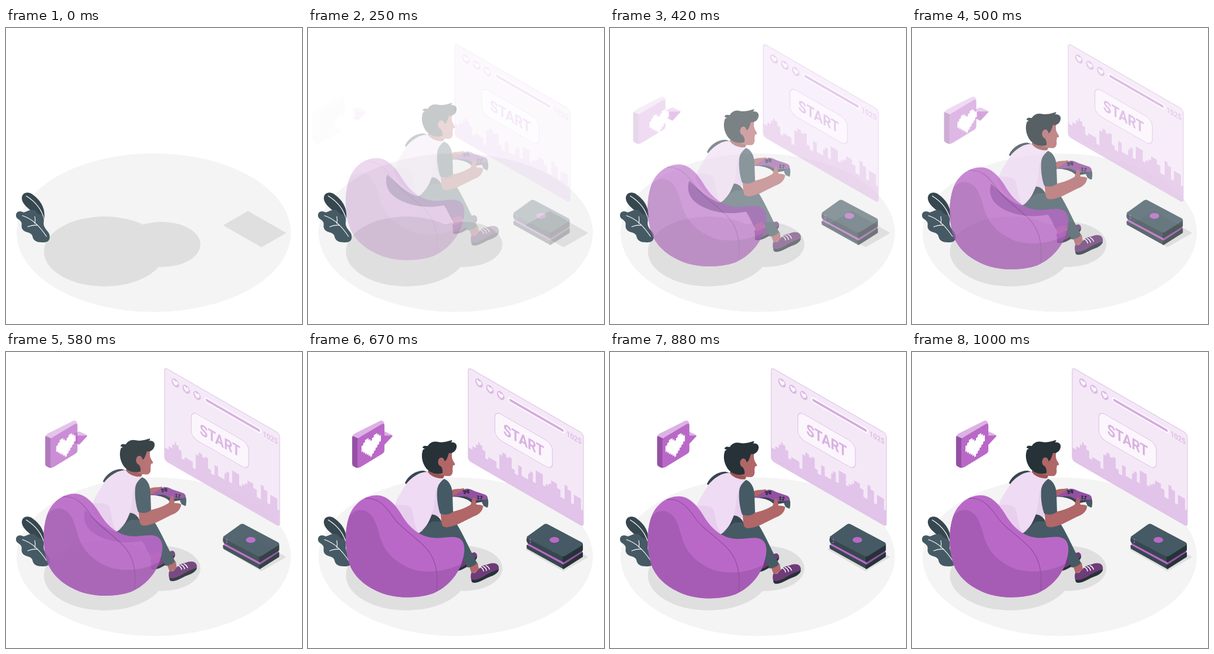
Animation of 504 by 504 pixels, one loop 1.04 s. Source, as an HTML page with a canvas:

```html
<!DOCTYPE html>
<html lang="en">
<head>
<meta charset="utf-8">
<title>Game time</title>
<style>
  html, body { margin: 0; width: 100%; height: 100%; overflow: hidden; background: #fff; }
  canvas { display: block; width: 100vw; height: 100vh; }
</style>
</head>
<body>
<canvas id="stage" width="504" height="504"></canvas>
<script>
const SIZE = 504, LOOP = 1040, FPS = 24, LEAD = 0.016, SLIDE = 30.2, ISO = 0.577;
const view = document.getElementById('stage').getContext('2d');
const buffer = document.createElement('canvas');
buffer.width = buffer.height = SIZE;
const g = buffer.getContext('2d');

const C = {
  purple: '#ba68c8', shade: '#a65cb4', deep: '#9450a3', lilac: '#e2c3e9',
  pale: '#f4e8f7', edge: '#dfc0e7', slate: '#455a64', dark: '#37474f',
  ink: '#263238', skin: '#b16668', skinDark: '#9a5553', shoe: '#6e3c79'
};

function fill(color, d) {
  g.fillStyle = color;
  g.fill(new Path2D(d));
}
function line(color, width, d) {
  g.strokeStyle = color;
  g.lineWidth = width;
  g.lineCap = g.lineJoin = 'round';
  g.stroke(new Path2D(d));
}
// Polygon whose corners are softened by a stroke of the same colour.
function soft(color, d, width = 3) {
  fill(color, d);
  line(color, width, d);
}
function oval(color, x, y, rx, ry) {
  g.fillStyle = color;
  g.beginPath();
  g.ellipse(x, y, rx, ry, 0, 0, Math.PI * 2);
  g.fill();
}
function panel(color, x, y, w, h, r) {
  g.beginPath();
  g.roundRect(x, y, w, h, r);
  g.fillStyle = color;
  g.fill();
  g.strokeStyle = C.edge;
  g.lineWidth = 1.1;
  g.stroke();
}
function isoText(text, x, y, size, color) {
  g.save();
  g.translate(x, y);
  g.scale(0.866, 1);
  g.font = `700 ${size}px Roboto, "Open Sans", sans-serif`;
  g.textAlign = 'center';
  g.textBaseline = 'alphabetic';
  g.fillStyle = color;
  g.fillText(text, 0, size * 0.355);
  g.restore();
}

function ground() {
  oval('#f4f4f4', 251.5, 348.5, 233.5, 135);
  oval('#dfdfdf', 167.5, 380.5, 103, 59.5);
  oval('#dfdfdf', 265, 368.5, 66, 38.5);
  soft('#dfdfdf', 'M372 336L412 313L475 349L435 372Z', 2.5);
}

function leaves() {
  fill(C.dark, 'M65 327C54 317 29 306 27 291C26 280 38 277 46 284C60 294 68 309 65 327Z');
  line('#fff', 1.2, 'M34.500 286C49 295 61 309 65 326');
  fill(C.slate, 'M17 319C17 313 23 310 30 314C35 313 40 309 47 310C53 311 51 316 57 317' +
    'C65 319 65 325 64 333C65 344 75 346 74.500 356C74 364 69 365 62 365' +
    'C52 365 46 362 45 354C42 347 34 349 29 344C24 338 29 334 25 329C22 325 17 325 17 319Z');
  line('#fff', 1.1, 'M28 319.500C45 325 57 337 69 355M49 321C50 325 50 329 49 333M37 338.500C43 336 48 335 54 336');
}

// Roof steps across the screen: left edge, height line.
const roofs = [
  [0, 136], [7, 130], [13, 123], [17, 117], [19.5, 120], [24, 126], [29, 138], [34, 133],
  [48, 143], [53, 117], [58, 111], [64, 115], [69, 112], [74, 129], [79, 135], [85, 117],
  [91, 132], [102, 121], [105, 116], [110, 131], [115, 109], [127, 127], [132, 122],
  [137, 118], [141, 111], [151, 118], [157, 130], [164, 105], [169, 110], [175, 130],
  [180, 113], [192, 131]
];

function screen() {
  const w = 196, h = 158;
  g.save();
  g.transform(1, ISO, 0, 1, 272.8, 26.2);
  panel(C.pale, 0, 0, w, h, 5);
  g.save();
  g.beginPath();
  g.roundRect(0, 0, w, h, 5);
  g.clip();
  g.beginPath();
  g.moveTo(0, h);
  roofs.forEach(([x, y], i) => {
    g.lineTo(x, y);
    g.lineTo(i + 1 < roofs.length ? roofs[i + 1][0] : w, y);
  });
  g.lineTo(w, h);
  g.fillStyle = C.lilac;
  g.fill();
  g.restore();
  for (let i = 0; i < 3; i++) {
    g.save();
    g.translate(18.3 + i * 18.5, 16);
    oval('#dcb8e4', 0, 0, 6.4, 6.8);
    fill('#fbf5fc', 'M0 4.500C-3 2-4.500 .5-4.500-1.500C-4.500-4.500-1-4.800 0-2.300C1-4.800 4.500-4.500 4.500-1.500C4.500 .5 3 2 0 4.500Z');
    g.restore();
  }
  line('#fff', 8.5, 'M72 14.500H160.500');
  line('#d6abe0', 4.4, 'M72 14.500H160.500');
  isoText('1025', 180, 15.6, 13, '#dfbde6');
  panel('#fbf5fc', 45.3, 47.5, 98, 45, 11);
  isoText('START', 94.3, 69.8, 26, '#d9b0e2');
  g.restore();
}

function boxes() {
  soft(C.dark, 'M373.500 330L435 362V368L374 334Z');
  soft(C.ink, 'M435 362L466.500 342V348L435 368Z');
  fill(C.purple, 'M374 324L435 356L467 336V341L435 362L374 329Z');
  fill(C.deep, 'M435 357L467 337V341L435 362Z');
  soft(C.dark, 'M373.500 318L435 349V356.500L375 324.500Q373.500 323 373.500 321Z');
  soft(C.ink, 'M435 349L466.500 328V337L435 356.500Z');
  soft(C.slate, 'M373.800 314.800Q372.500 315.800 375 317L432 346.500Q435 348 438 346L466 328.500Q468 326.500 465.500 325L408 294.300Q405 292.800 402 294.500Z', 2);
  oval(C.purple, 419.5, 320, 8.2, 4.9);
  oval(C.purple, 378.5, 319.5, 0.9, 1.4);
  oval(C.purple, 378.5, 324, 0.9, 1.4);
}

function player() {
  // far leg
  fill(C.slate, 'M200 305L262 320L264 345L247 352C239 340 236 326 226 320Z');
  fill(C.skin, 'M246 346L261 342L263 354L248 358Z');
  fill(C.shoe, 'M246 356C252 360 256 354 262 352C270 349 276 342 283 341C288 342 289 347 287 351C282 358 272 363 265 368C258 373 250 373 247 370Z');
  fill(C.ink, 'M247 369C258 371 270 362 288 348C288 356 273 365 265 369C258 373 250 374 247 372Z');

  // torso
  fill(C.dark, 'M165 223C171 210 183 202 197 202L206 205C190 205 177 212 167 225Z');
  fill('#efdbf3', 'M204 204C187 204 174 215 163 232C153 247 147 258 146 268C154 286 171 303 188 307C203 302 217 289 224 278C229 254 229 235 232 216C222 215 211 212 204 204Z');
  fill('#e8cfee', 'M146 260C158 261 169 258 175 265C181 274 178 291 188 307C171 303 153 284 146 268Z');
  fill('#e8cfee', 'M188 307C200 298 207 289 211 276C217 257 214 240 222 226L228 276C217 289 203 302 188 307Z');

  // hips and near leg
  fill(C.dark, 'M194 304C203 297 207 286 211 276.500C219 277 226 283 228 291L212 294Z');
  fill(C.skin, 'M274 364L289 359L291 371L279 378Z');
  fill(C.slate, 'M135 272C131 282 133 294 140 303C154 319 183 328 212 327C226 326 238 323 248 322' +
    'C258 335 263 350 272 367C279 366 284 364 288 359C276 338 263 307 252 291C233 289 224 287 212 289' +
    'C204 291 199 304 187 309C166 303 150 285 135 272Z');
  fill(C.shoe, 'M278 376C284 378 288 373 292 368C297 362 304 363 310 360C319 358 325 361 325 368C325 374 318 379 309 382C299 386 291 392 283 392C277 391 276 382 278 376Z');
  fill(C.ink, 'M278 387C290 392 302 377 325 370C325 375 318 380 309 383C299 387 291 393 283 393C279 393 278 390 278 387Z');
  line('#fff', 1.5, 'M293 366Q298 368 299 373M298 365Q303 367 304 372M303 363.500Q308 366 309 370');

  // head
  fill(C.skinDark, 'M206 198L234 207L230 215C219 216 208 211 204 204Z');
  fill(C.skin, 'M220 180L238 168L246 170C244 176 245 181 247 185L250.500 191C250 193 248 193 247 193L246 199C247 204 246 209 242 211C234 212 227 210 219 206Z');
  fill(C.ink, 'M195 163C196 158 201 160 204 160C207 155 213 151 221 153C230 155 237 152 245 150C246 151 245 153 243 154C249 153 254 156 253 162C252 169 246 173 240 172C238 177 237 183 233 187C231 193 231 201 230 206C217 210 204 205 198 193C193 183 193 173 196 166L199 165Z');
  oval(C.skin, 227, 187, 5.6, 7.4);
  fill(C.skin, 'M225 193L235 184L234 209L229 207C230 200 228 197 225 193Z');

  // controller and arms
  fill(C.skin, 'M244 236C249 232 257 234 265 232C269 235 265 240 261 242L246 247Z');
  fill(C.dark, 'M246 246C256 247 266 248 274 253L280 258L298 255L306 265C308 255 307 249 302 245L270 236Z');
  fill(C.deep, 'M246 245C254 242 260 237 266 234C271 231 278 234 284 237L302 243C308 247 307 252 300 252C295 253 290 251 286 253C280 253 275 247 267 246C258 245 252 248 246 245Z');
  line(C.ink, 2.6, 'M265 236.500L269 237.500M271 235.500L273.500 236.500M266 240L267.500 240.500M271.500 238.800L273.500 239.500');
  line(C.ink, 2.6, 'M289.500 245.500L290.500 246M295 246L296 246.500M289.500 249L290.500 249.500M294.500 249.500L295 250');
  fill(C.slate, 'M306 249C307 255 306 260 305 265L299 262L296 256Z');
  fill(C.skin, 'M226 273C226 282 227 292 229 296C234 301 245 297 256 293L282 280C291 277 297 271 298 264C299 261 295 260 287 260C286 255 286 250 283 247C279 249 279 255 277 260C269 265 259 269 246 272Z');
  fill(C.slate, 'M232 216C240 219 246 229 246 243L247 272C241 277 233 278 225 275C221 263 219 249 220 235C221 226 226 220 232 216Z');
}

const bagShape = 'M118 244C135 244.500 148 259 158 275C169 294 184 310 205 315C225 320 245 311 257 317' +
  'C269 323 268 341 262 358C254 382 236 401 213 411C190 419 158 420 133 413C104 404 80 386 71 362' +
  'C62 335 62 304 70 280C78 257 98 243.500 118 244Z';

function bag() {
  fill(C.purple, bagShape);
  g.save();
  g.clip(new Path2D(bagShape));
  fill(C.shade, 'M60 300C68 277 78 268 92 269C110 272 116 290 122 312C129 340 149 359 178 370C208 378 240 373 270 356V430H60Z');
  g.restore();
  line(C.deep, 1.3, 'M97 249.500C116 247 130 259 143 278C158 301 185 315 203 336C218 354 222 380 219 406');
}

function pointer() {
  soft('#dab0e2', 'M118 141L130 136L143 142L130 146Z', 1.5);
  soft(C.purple, 'M118 143L143 143L130 157L118 151Z', 1.5);
}

function bubble() {
  fill(C.deep, 'M75 146Q75 142 78 142L86 147V197Q82 198 78 195Q75 194 75 190Z');
  fill('#dcb2e4', 'M76 143Q77 140 80 138.500L122 117.500Q125 116 128 118L130 122L87 148Z');
  fill(C.purple, 'M84 151Q84 147 88 145L125 123Q130 120 130 125V167Q130 171 126 173.500L90 195.500Q84 199 84 193Z');
}

// First and last cell of each run, row by row.
const pixelHeart = [[2, 3, 7, 8], [1, 4, 6, 9], [0, 10], [0, 10], [0, 10], [1, 9], [2, 8], [3, 7], [4, 6], [5, 5]];

function heart() {
  g.save();
  g.transform(1, -ISO, 0, 1, 91, 153.5);
  g.fillStyle = '#fff';
  g.beginPath();
  pixelHeart.forEach((runs, row) => {
    for (let i = 0; i < runs.length; i += 2) {
      g.rect(runs[i] * 3, row * 3.4, (runs[i + 1] - runs[i] + 1) * 3, 3.5);
    }
  });
  g.fill();
  g.restore();
}

// Cubic curve (.36, -.01, .5, 1.38): gentle start, small overshoot.
function ease(x) {
  if (x >= 1) return 1;
  const curve = (s, a, b) => 3 * (1 - s) ** 2 * s * a + 3 * (1 - s) * s * s * b + s ** 3;
  let lo = 0, hi = 1;
  for (let i = 0; i < 30; i++) {
    const mid = (lo + hi) / 2;
    if (curve(mid, 0.36, 0.5) < x) lo = mid; else hi = mid;
  }
  return curve(lo, -0.01, 1.38);
}

function layer(draw, alpha = 1, dx = 0, dy = 0) {
  g.clearRect(0, 0, SIZE, SIZE);
  g.save();
  g.translate(dx, dy);
  draw();
  g.restore();
  view.globalAlpha = Math.max(0, Math.min(1, alpha));
  view.drawImage(buffer, 0, 0);
  view.globalAlpha = 1;
}

function render(step) {
  view.fillStyle = '#fff';
  view.fillRect(0, 0, SIZE, SIZE);
  layer(ground);
  layer(leaves);
  if (step < 2) return;
  const e = ease(step / FPS + LEAD), d = (e - 1) * SLIDE;
  layer(screen, e, d);
  layer(boxes, e, d);
  layer(player, e, 0, d);
  layer(bag, e, 0, d);
  // nested slides multiply both the travel and the fade; the heart stays solid
  layer(pointer, e ** 2, d * 2);
  layer(bubble, e ** 3, d * 3);
  layer(heart, 1, d * 2);
}

const start = performance.now();
let shown = -1;
function tick() {
  const t = (performance.now() - start) % LOOP;
  const step = Math.min(FPS, Math.floor((t + 5) * FPS / 1000));
  if (step !== shown) render(shown = step);
  requestAnimationFrame(tick);
}
tick();
</script>
</body>
</html>
```
